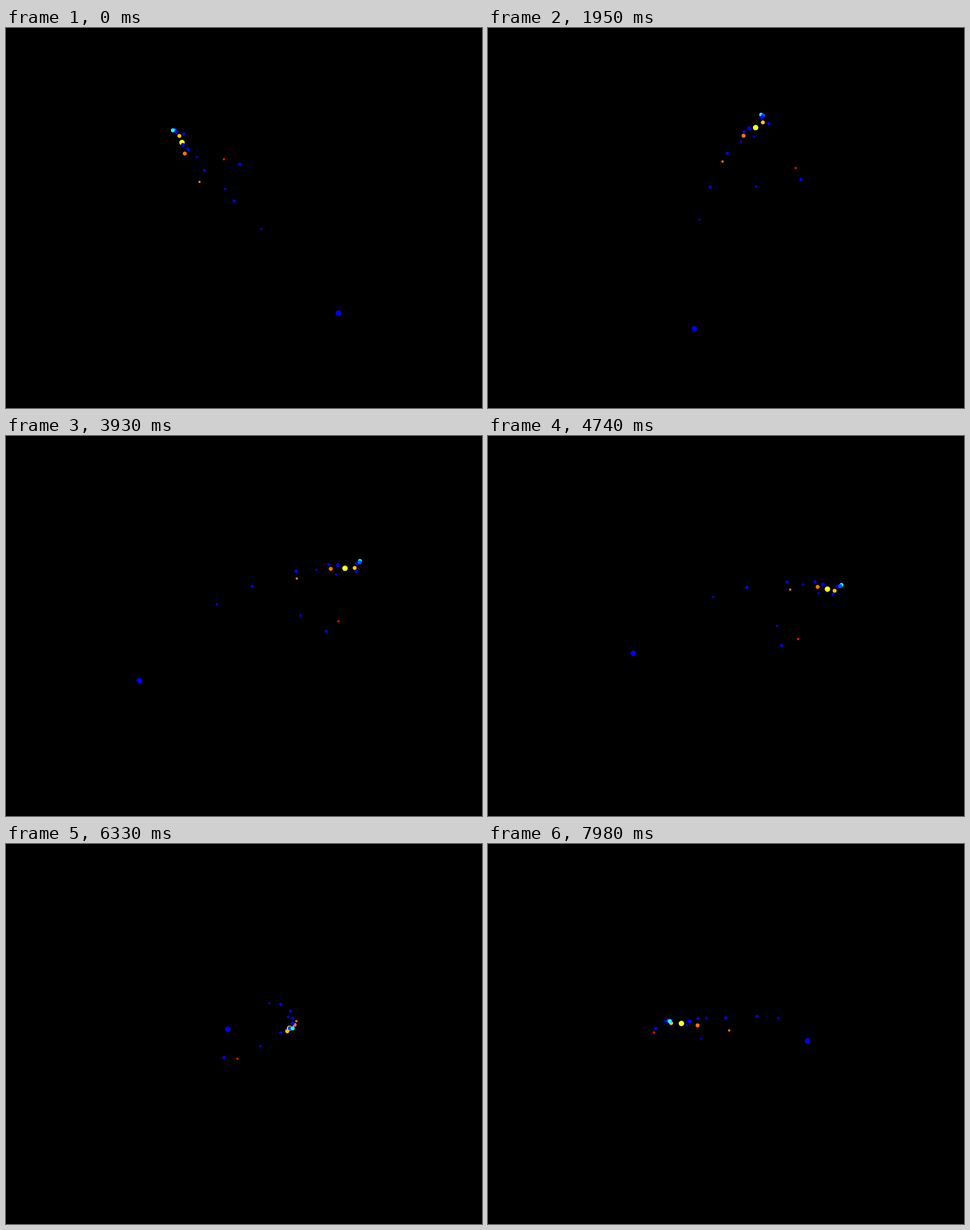
A matplotlib script for the animation above (8000 ms loop, 837 by 669 pixels).

```python
import numpy as np
import matplotlib.pyplot as plt
from matplotlib.animation import FuncAnimation

W, H, DPI = 837, 669, 64
FRAMES, LOOP_MS = 267, 8000
CENTER = (435.9, 330.9)      # screen position of the pivot
DISTANCE = 2784.0            # eye to pivot, in pixels
ELEV = np.radians(30)

BLUE = "#0000ff"
TINY, SMALL, MEDIUM, LARGE = 4.0, 5.5, 7.0, 9.5

# across, toward the viewer, up, diameter, colour
STARS = [
    (-145.0, -118.6, 108.6, MEDIUM, "#24fff4"),
    (-141.8, -120.6, 107.9, MEDIUM, "#0058ff"),
    (-138.8, -117.1, 106.1, MEDIUM, BLUE),
    (-126.2, -125.2, 97.9, SMALL, BLUE),
    (-133.5, -116.4, 98.6, MEDIUM, "#ffc400"),
    (-128.2, -99.3, 94.1, LARGE, "#ffff20"),
    (-126.1, -85.5, 96.4, MEDIUM, BLUE),
    (-117.5, -71.3, 96.4, SMALL, BLUE),
    (-116.0, -89.7, 83.5, TINY, BLUE),
    (-122.4, -72.4, 86.0, MEDIUM, "#ff7800"),
    (-101.0, -57.0, 87.3, TINY, BLUE),
    (-86.3, -23.2, 78.3, SMALL, BLUE),
    (-95.2, -18.0, 58.5, TINY, "#ff8010"),
    (-54.7, -144.6, 36.3, TINY, "#ff1000"),
    (-26.2, -141.0, 28.0, SMALL, BLUE),
    (-51.3, -63.3, 18.9, TINY, BLUE),
    (-34.2, 33.7, 49.2, SMALL, BLUE),
    (13.2, 75.7, 17.9, TINY, BLUE),
    (144.9, 145.0, -108.7, LARGE, BLUE),
]
across, toward, up, diameter = np.array([s[:4] for s in STARS]).T
colors = np.array([s[4] for s in STARS])
areas = (diameter * 72 / DPI) ** 2


def project(azim):
    """Screen positions and depth after turning the camera by azim."""
    c, s = np.cos(azim), np.sin(azim)
    side = across * c - toward * s
    near = toward * c + across * s
    height = up * np.cos(ELEV) - near * np.sin(ELEV)
    depth = near * np.cos(ELEV) + up * np.sin(ELEV)
    scale = DISTANCE / (DISTANCE - depth)
    xy = np.column_stack([CENTER[0] + side * scale,
                          CENTER[1] - height * scale])
    return xy, depth


fig = plt.figure(figsize=(W / DPI, H / DPI), dpi=DPI, facecolor="black")
ax = fig.add_axes([0, 0, 1, 1])
ax.set(xlim=(0, W), ylim=(H, 0))
ax.axis("off")
dots = ax.scatter(across, up, s=areas, c=colors, linewidths=0)


def update(frame):
    xy, depth = project(np.radians(frame))   # one degree per frame
    order = np.argsort(depth)                # nearest drawn last
    dots.set_offsets(xy[order])
    dots.set_sizes(areas[order], dpi=DPI)
    dots.set_facecolor(list(colors[order]))
    return (dots,)


anim = FuncAnimation(fig, update, frames=FRAMES, init_func=lambda: update(0),
                     interval=LOOP_MS / FRAMES, repeat=True, repeat_delay=0)
plt.show()
```
